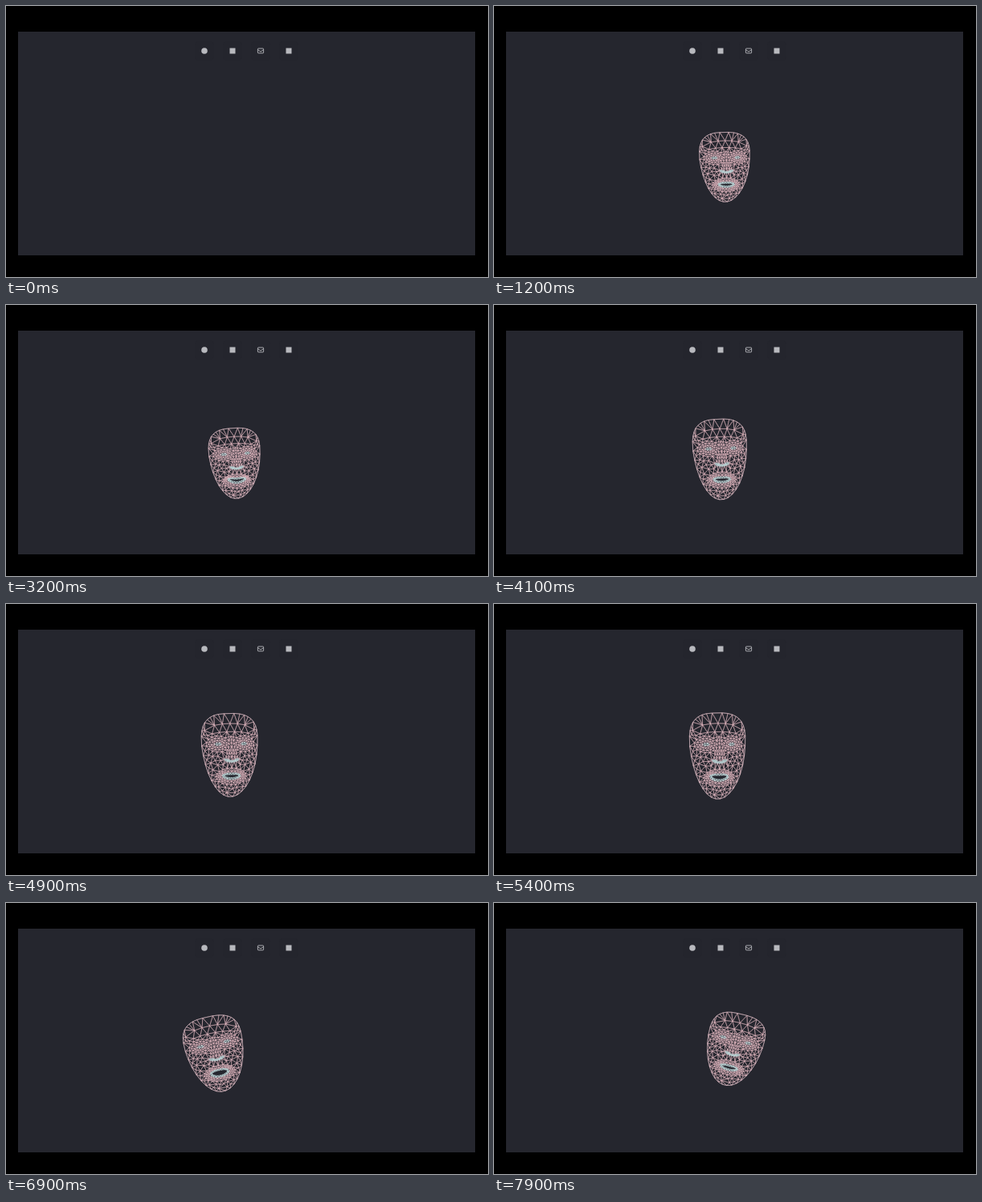
An HTML page with a canvas for the animation above (8 s loop, 600 by 338 pixels).

```html
<!DOCTYPE html>
<html lang="en">
<head>
<meta charset="utf-8">
<title>Face mesh</title>
<style>
  html, body { margin: 0; width: 100%; height: 100%; overflow: hidden; background: #000; }
  canvas { display: block; }
</style>
</head>
<body>
<canvas id="stage" width="600" height="338"></canvas>
<script>
const ctx = document.getElementById('stage').getContext('2d');
const LOOP = 8000, STEP = 100, START = 600, TAU = Math.PI * 2;
const SCALE_X = 35, SCALE_Y = 52, RIM_COUNT = 36, MOUTH_Y = .51;

// Head path: time, centre, half size, roll in degrees
const path = [
  { t: 600, x: 289, y: 203, w: 32, h: 40, roll: 0 },
  { t: 2200, x: 283.5, y: 196.5, w: 30, h: 45, roll: -3 },
  { t: 3200, x: 285, y: 197.5, w: 32, h: 44, roll: -3 },
  { t: 4900, x: 278.5, y: 188.5, w: 35, h: 52, roll: -1 },
  { t: 6000, x: 278, y: 191, w: 34.5, h: 51.5, roll: 0 },
  { t: 6700, x: 252, y: 190, w: 37, h: 49, roll: -13 },
  { t: 6900, x: 261, y: 188.5, w: 36.5, h: 47.5, roll: -12 },
  { t: 7700, x: 305, y: 184, w: 36, h: 46.5, roll: 15 },
  { t: 7900, x: 298, y: 183, w: 35, h: 45.5, roll: 14 }
];
const pulse = (t, center) => Math.exp(-(((t - center) / 450) ** 2));

function poseAt(t) {
  const i = Math.max(1, path.findIndex(p => p.t >= t)), a = path[i - 1], b = path[i];
  const k = (t - a.t) / (b.t - a.t), ease = k * k * (3 - 2 * k), pose = {};
  for (const key in a) pose[key] = a[key] + (b[key] - a[key]) * ease;
  pose.h += 8 * k * (1 - k);
  pose.yaw = .08 - .006 * Math.abs(pose.roll);
  pose.smile = .02 + .06 * pulse(t, 3200) + .12 * pulse(t, 6000);
  pose.open = .015 + .05 * pulse(t, 2200) + .065 * pulse(t, 6000) + .03 * pulse(t, 6900);
  return pose;
}

let seed = 7;
function random() {
  seed = seed * 16807 % 2147483647;
  return seed / 2147483647 - .5;
}

// Face points in a -1..1 square; a point too near an earlier one is skipped
const points = [];
function add(u, v, gap, extra) {
  const near = points.some(p => Math.hypot((p.u - u) * SCALE_X, (p.v - v) * SCALE_Y) < gap);
  if (!near) points.push({ u: u + .004 * random(), v: v + .004 * random(), ...extra });
}
function addPair(u, v, gap, extra) {
  add(u, v, gap, extra);
  if (u) add(-u, v, gap, extra);
}
function rim(angle) {
  const c = Math.cos(angle), s = Math.sin(angle);
  if (s > 0) return [c * (1 - .06 * s), -.35 + 1.35 * s];
  return [Math.sign(c) * Math.abs(c) ** .71, -.35 - .65 * Math.abs(s) ** .71];
}

function buildPoints() {
  for (let i = 0; i < RIM_COUNT; i++) add(...rim((i + .5) / RIM_COUNT * TAU), 0);

  for (let ring = 0; ring < 5; ring++) {
    for (let i = 0; i < 20; i++) {
      const a = (i + ring / 2) / 20 * TAU, c = Math.cos(a), s = Math.sin(a);
      add((.25 + .07 * ring) * c, MOUTH_Y + (.02 + .045 * ring) * s, ring ? 1.5 : .5,
        { c, s, flex: 1 - ring / 5, lip: ring < 2, hole: ring === 0 });
    }
  }

  // Nose: base arcs, then a widening bridge
  for (let arc = 0; arc < 3; arc++) {
    for (let i = 0; i <= 5; i++) {
      const a = i / 5 * Math.PI / 2, size = 1 - .25 * arc;
      addPair(.27 * size * Math.cos(a), .09 + .08 * size * Math.sin(a), 1.2, { lip: true });
    }
  }
  for (let v = -.44; v < .08; v += .08) {
    const width = .08 + .14 * ((v + .44) / .52) ** 2;
    for (let k = 0; k <= 1; k += .5) addPair(width * k, v, 2);
  }

  for (let ring = 0; ring < 4; ring++) {
    for (let i = 0; i < 15; i++) {
      const a = (i + ring / 2) / 15 * TAU;
      addPair(.46 + (.12 + .09 * ring) * Math.cos(a), -.27 + (.03 + .055 * ring) * Math.sin(a),
        2, { lip: ring === 0 });
    }
  }

  // Side bands, forehead and cheeks
  for (let band = 0; band < 2; band++) {
    for (let i = -2; i < 9; i++) {
      const [u, v] = rim((i + band / 2) / RIM_COUNT * TAU), k = .92 - .11 * band;
      addPair(u * k, v * k, 3);
    }
  }
  for (let i = 0; i < 4; i++) {
    addPair(i * .27, -.76 + .01 * i * i, 6);
    addPair(.14 + i * .25, -.56 + .01 * i * i, 4);
  }
  for (let row = 0; row < 13; row++) {
    const v = -.4 + row * .105;
    const edge = .88 * Math.sqrt(Math.max(0, 1 - ((v + .35) / 1.35) ** 2));
    for (let u = row % 2 * .08; u < edge; u += .16) addPair(u + .03 * random() * (u > 0), v, 4.2);
  }
}

// Delaunay triangulation by incremental insertion
function triangulate(list) {
  const xy = list.map(p => [p.u * SCALE_X, p.v * SCALE_Y]);
  const n = xy.length;
  xy.push([-9000, -9000], [9000, -9000], [0, 9000]);
  const make = (a, b, c) => {
    const [ax, ay] = xy[a], bx = xy[b][0] - ax, by = xy[b][1] - ay;
    const cx = xy[c][0] - ax, cy = xy[c][1] - ay;
    const d = 2 * (bx * cy - by * cx), bb = bx * bx + by * by, cc = cx * cx + cy * cy;
    const x = (cy * bb - by * cc) / d, y = (bx * cc - cx * bb) / d;
    return { v: [a, b, c], x: ax + x, y: ay + y, r: x * x + y * y };
  };
  let tris = [make(n, n + 1, n + 2)];
  for (let i = 0; i < n; i++) {
    const border = new Map();
    tris = tris.filter(t => {
      if ((xy[i][0] - t.x) ** 2 + (xy[i][1] - t.y) ** 2 >= t.r) return true;
      t.v.forEach((a, k) => {
        const b = t.v[(k + 1) % 3], key = Math.min(a, b) + '-' + Math.max(a, b);
        if (border.has(key)) border.delete(key);
        else border.set(key, [a, b]);
      });
      return false;
    });
    for (const [a, b] of border.values()) tris.push(make(a, b, i));
  }
  return tris.map(t => t.v).filter(t => t.every(i => i < n));
}

buildPoints();
const all = key => tri => tri.every(i => points[i][key]);
const mesh = triangulate(points).filter(tri => !all('hole')(tri));
const lips = mesh.filter(all('lip'));
const skin = mesh.filter(tri => !all('lip')(tri));
const outline = [...Array(RIM_COUNT).keys()];

function strokeShapes(shapes, xy, color, width) {
  ctx.beginPath();
  for (const shape of shapes) {
    shape.forEach((i, k) => k ? ctx.lineTo(...xy[i]) : ctx.moveTo(...xy[i]));
    ctx.closePath();
  }
  ctx.strokeStyle = color;
  ctx.lineWidth = width;
  ctx.stroke();
}

function drawFace(pose) {
  const angle = pose.roll * Math.PI / 180, cos = Math.cos(angle), sin = Math.sin(angle);
  const xy = points.map(p => {
    let { u, v } = p;
    const depth = Math.max(0, 1 - u * u - v * v);
    if (p.flex) {
      u += p.flex * pose.smile * .7 * p.c;
      v += p.flex * (pose.open * p.s - pose.smile * (.3 + .7 * p.c * p.c));
    }
    const x = (u + pose.yaw * depth) * pose.w, y = v * pose.h;
    return [pose.x + x * cos - y * sin, pose.y + x * sin + y * cos];
  });
  ctx.lineJoin = 'round';
  strokeShapes(skin, xy, '#e2b7c0', .48);
  strokeShapes(lips, xy, '#c0d8da', .6);
  strokeShapes([outline], xy, '#d6bdc4', .6);
}

function drawPage() {
  ctx.fillStyle = '#000';
  ctx.fillRect(0, 0, 600, 338);
  ctx.fillStyle = '#25262e';
  ctx.fillRect(15, 32, 569, 279);
  ctx.fillStyle = '#24252d';
  for (let i = 0; i < 4; i++) {
    ctx.beginPath();
    ctx.roundRect(235 + i * 35, 44, 24, 24, 5);
    ctx.fill();
  }
  ctx.fillStyle = ctx.strokeStyle = '#b8b9be';
  ctx.beginPath();
  ctx.arc(247, 56, 3.8, 0, TAU);
  ctx.fill();
  ctx.fillRect(278.5, 52.5, 7, 7);
  ctx.fillRect(348.5, 52.5, 7, 7);
  ctx.lineWidth = .9;
  ctx.beginPath();
  ctx.roundRect(313.4, 53, 7.2, 5.8, .8);
  ctx.moveTo(313.5, 54.6);
  ctx.lineTo(317, 57);
  ctx.lineTo(320.5, 54.6);
  ctx.stroke();
}

function frame() {
  const time = Math.floor(performance.now() % LOOP / STEP) * STEP;
  drawPage();
  if (time >= START) drawFace(poseAt(time));
  requestAnimationFrame(frame);
}
frame();
</script>
</body>
</html>
```
